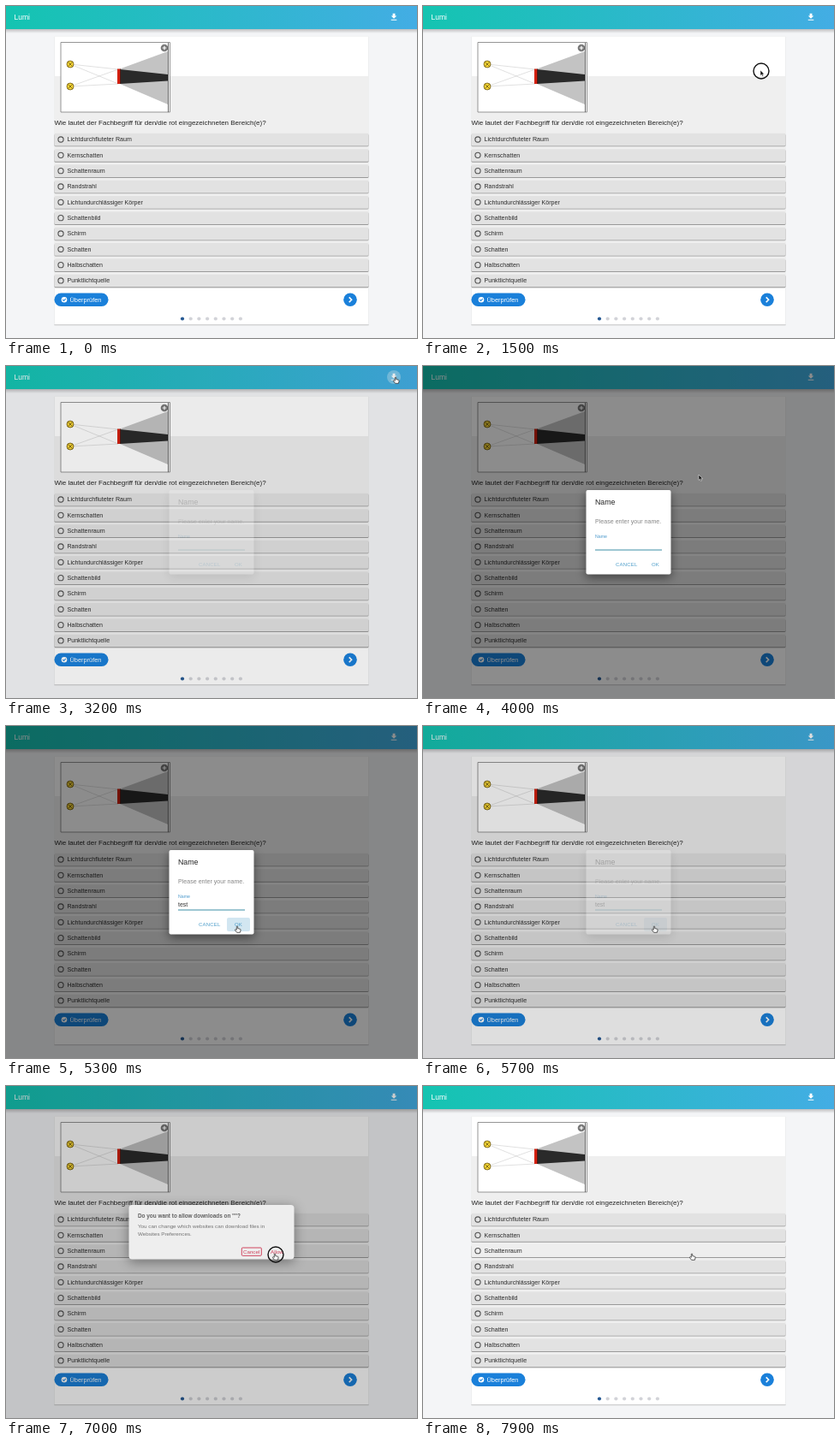
An HTML page for the animation above (8000 ms loop, 480 px wide and 388 px high).

```html
<!DOCTYPE html>
<html lang="de">
<meta charset="utf-8">
<title>Quiz</title>
<style>
  html, body { margin: 0; width: 100%; height: 100%; overflow: hidden; background: #f4f5f7 }
  svg { display: block; width: 480px; height: 388px; font-family: "Liberation Sans", Arial, sans-serif }
  .material { filter: drop-shadow(0 4px 6px #0007) }
  .sheet { filter: drop-shadow(0 3px 7px #0006) }
</style>
<body>
<svg viewBox="0 0 480 388">
  <defs>
    <linearGradient id="bar"><stop stop-color="#14c4b1"/><stop offset="1" stop-color="#43ade4"/></linearGradient>
    <linearGradient id="fall" x2="0" y2="1"><stop stop-color="#000" stop-opacity=".22"/><stop offset="1" stop-opacity="0"/></linearGradient>
  </defs>
  <rect width="480" height="388" fill="#f4f5f7"/>
  <rect y="27" width="480" height="5" fill="url(#fall)"/>
  <rect width="480" height="27" fill="url(#bar)"/>
  <text x="9.5" y="16" font-size="8.5" fill="#fff">Lumi</text>
  <circle id="glow" cx="453" cy="13" r="8" fill="#fff" fill-opacity=".3"/>
  <path transform="translate(447.4 7.3) scale(.47)" fill="#fff" d="M19 9h-4V3H9v6H5l7 7 7-7zM5 18v2h14v-2H5z"/>

  <rect x="56" y="35.5" width="368" height="338" rx="1" fill="#000" fill-opacity=".1"/>
  <path d="M56.5 35.5h367v337h-367z" fill="#fff"/>
  <path d="M56.5 82h367v248h-367z" fill="#efefef"/>
  <path d="M56.5 372.5h367" stroke="#c9cacc" stroke-width=".8"/>

  <g>
    <path d="M64 42.5h127.5v81.500h-127.500z" fill="#fff" stroke="#8a8a8a" stroke-width=".9"/>
    <path d="M75 68L131 74L189 80M75 68L131 91M75 94L131 74M75 94L131 91" fill="none" stroke="#c2c2c2" stroke-width=".5"/>
    <path d="M133 73.500L189 53V115L133 91z" fill="#c3c3c3"/>
    <path d="M133 74L189 80V87.500L133 91z" fill="#2a2a2a"/>
    <path d="M130 73.500h3.500v17.500h-3.500z" fill="#d3200f"/>
    <path d="M133.500 73.500v17.500" stroke="#51140e" stroke-width=".8"/>
    <path d="M189.500 43v81" stroke="#555" stroke-width=".9"/>
    <g id="lamps" fill="#f6d536" stroke="#6b5612" stroke-width=".8"></g>
    <circle cx="185" cy="49" r="4.300" fill="#777"/>
    <path d="M182.700 49h4.600M185 46.700v4.600" stroke="#fff" stroke-width="1.200"/>
  </g>

  <text x="56.500" y="139.300" font-size="8" fill="#222">Wie lautet der Fachbegriff für den/die rot eingezeichneten Bereich(e)?</text>
  <g id="rows"></g>

  <rect x="56.500" y="335.500" width="63" height="15.500" rx="7.750" fill="#1a80da"/>
  <circle cx="68" cy="343.200" r="3.300" fill="#fff"/>
  <path d="M66.300 343.200l1.300 1.300l2.200-2.500" fill="none" stroke="#1a80da" stroke-width="1.100"/>
  <text x="74.500" y="345.800" font-size="7.400" fill="#fff">Überprüfen</text>
  <circle cx="402" cy="343.300" r="7.800" fill="#1a80da"/>
  <path d="M400.700 340.400l2.900 2.900l-2.900 2.900" fill="none" stroke="#fff" stroke-width="1.600"/>
  <g id="dots"></g>

  <rect id="shade" width="480" height="388"/>

  <g id="nameDialog">
    <rect class="material" x="190.500" y="145" width="99" height="98.500" rx="2" fill="#fff"/>
    <text x="201" y="161.800" font-size="8.800" fill="#222">Name</text>
    <text x="201" y="184" font-size="7.100" fill="#858585">Please enter your name.</text>
    <text x="201" y="201" font-size="5.200" fill="#4a98cb">Name</text>
    <text id="typed" x="201" y="210.500" font-size="7" fill="#333"></text>
    <path id="caret" d="M201.500 204v8" stroke="#444" stroke-width=".6"/>
    <path d="M201 215h78" stroke="#3d8fa5"/>
    <rect id="okHover" x="258" y="224" width="27" height="16" rx="2" fill="#4a9cc9" fill-opacity=".25"/>
    <g font-size="6" letter-spacing=".2" fill="#4a9cc9">
      <text x="225" y="234.200">CANCEL</text><text x="267" y="234.200">OK</text>
    </g>
  </g>

  <g id="allowDialog">
    <rect class="sheet" x="143.500" y="139" width="193" height="63.500" rx="4" fill="#eee"/>
    <text x="154" y="154.300" font-size="6.400" font-weight="bold" fill="#606060">Do you want to allow downloads on ""?</text>
    <g font-size="6.260" fill="#747474">
      <text x="154" y="166.300">You can change which websites can download files in</text>
      <text x="154" y="174.800">Websites Preferences.</text>
    </g>
    <rect x="275.300" y="189" width="23" height="9.300" rx="1" fill="none" stroke="#d0455f"/>
    <g font-size="6.200" fill="#cf3f5a"><text x="277" y="195.900">Cancel</text><text x="309" y="195.900">Allow</text></g>
  </g>

  <g id="pointer">
    <circle id="ring" cx="1" cy="1" r="9" fill="none" stroke="#111" stroke-width="1.400"/>
    <path id="arrow" d="M0 0V6.400L1.500 5.100L2.500 7.300L3.600 6.800L2.700 4.700H4.600z" fill="#111" stroke="#fff" stroke-width=".5"/>
    <path id="hand" d="M-.7 .4Q0-.5 .7 .4V2.600L3.600 3.300Q4.300 3.700 4 5L3.400 7.300H-.4L-2.500 4.600Q-2.600 3.600-1.700 3.700L-.7 4.300z" fill="#fff" stroke="#333" stroke-width=".8"/>
  </g>
</svg>
<script>
const $ = id => document.getElementById(id);
const LOOP = 8000, STEP = 100;
const answers = ['Lichtdurchfluteter Raum', 'Kernschatten', 'Schattenraum', 'Randstrahl',
  'Lichtundurchlässiger Körper', 'Schattenbild', 'Schirm', 'Schatten', 'Halbschatten', 'Punktlichtquelle'];
const rowY = i => 156 + i * 18.33;

$('rows').innerHTML = answers.map((label, i) => {
  const y = rowY(i);
  return `<rect x="56.500" y="${y - 6.4}" width="367" height="14.700" rx="1.500" fill="#999"/>
    <rect class="row" x="56.500" y="${y - 7.2}" width="367" height="14.600" rx="1.500"/>
    <circle cx="64" cy="${y}" r="3.100" fill="none" stroke="#505050" stroke-width="1.100"/>
    <text x="71.500" y="${y + 2.3}" font-size="7.100" fill="#2b2b2b">${label}</text>`;
}).join('');
$('lamps').innerHTML = [68, 94].map(y =>
  `<circle cx="75" cy="${y}" r="4"/><path d="M72.300 ${y - 2.7}l5.400 5.400m0-5.400l-5.400 5.400"/>`).join('');
$('dots').innerHTML = Array.from({ length: 8 }, (_, i) =>
  `<circle cx="${206 + i * 9.7}" cy="365.500" r="2.100" fill="${i ? '#d2d3d8' : '#275a94'}"/>`).join('');
const rows = document.querySelectorAll('.row');

// Pointer stops: time, x, y
const path = [[1000, 330, 178], [1300, 394, 75], [1700, 394, 75], [2300, 455, 13], [3400, 455, 13],
  [4000, 322, 127], [4300, 250, 204], [4800, 250, 204], [5200, 270, 234], [5700, 270, 234],
  [6000, 271, 235], [6200, 271, 235], [6700, 314, 196], [8000, 314, 196]];
const clicks = [1500, 3000, 5500, 6900];

const clamp = x => Math.max(0, Math.min(1, x));
const ease = x => x * x * (3 - 2 * x);
const within = (t, a, b) => t >= a && t < b;
const fade = (t, start, inTime, end, outTime) =>
  Math.min(clamp((t - start) / inTime), 1 - clamp((t - end) / outTime));
const show = (id, on) => $(id).setAttribute('opacity', +on);

function pointerAt(t) {
  const i = Math.max(1, path.findIndex(p => p[0] > t));
  const [t0, x0, y0] = path[i - 1], [t1, x1, y1] = path[i];
  const k = ease(clamp((t - t0) / (t1 - t0)));
  return [x0 + (x1 - x0) * k, y0 + (y1 - y0) * k];
}

function draw(t) {
  const name = fade(t, 3160, 225, 5550, 195);
  const allow = fade(t, 5800, 220, 7000, 200);
  const [x, y] = pointerAt(t);
  const free = !name && !allow;

  show('nameDialog', name);
  show('allowDialog', allow);
  show('shade', Math.max(name * .45, allow * .2, within(t, 5700, 6000) ? .13 : 0));
  show('glow', within(t, 2200, 3500));
  show('okHover', within(t, 5100, 5800));

  const count = Math.floor(clamp((t - 4300) / 400) * 4);
  $('typed').textContent = 'test'.slice(0, count);
  $('caret').setAttribute('transform', `translate(${[0, 2, 6, 9.5, 11.5][count]} 0)`);
  show('caret', within(t, 4200, 5300) && t % 1000 < 600);

  rows.forEach((row, i) => {
    const hover = free && t >= 1000 && Math.abs(y - rowY(i)) < 7.3;
    row.setAttribute('fill', hover ? '#eeeeee' : '#e2e2e2');
  });

  const hand = within(t, 2200, 3500) || t >= 5100 || (t < 1200 && y > 148);
  $('pointer').setAttribute('transform', `translate(${x} ${y})`);
  show('pointer', t >= 1000 && !within(t, 4400, 4800));
  show('hand', hand);
  show('arrow', !hand);
  show('ring', clicks.some(c => within(t, c, c + 200)));
}

function tick() {
  draw(Math.floor(performance.now() % LOOP / STEP) * STEP);
  requestAnimationFrame(tick);
}
tick();
</script>
</body>
</html>
```
